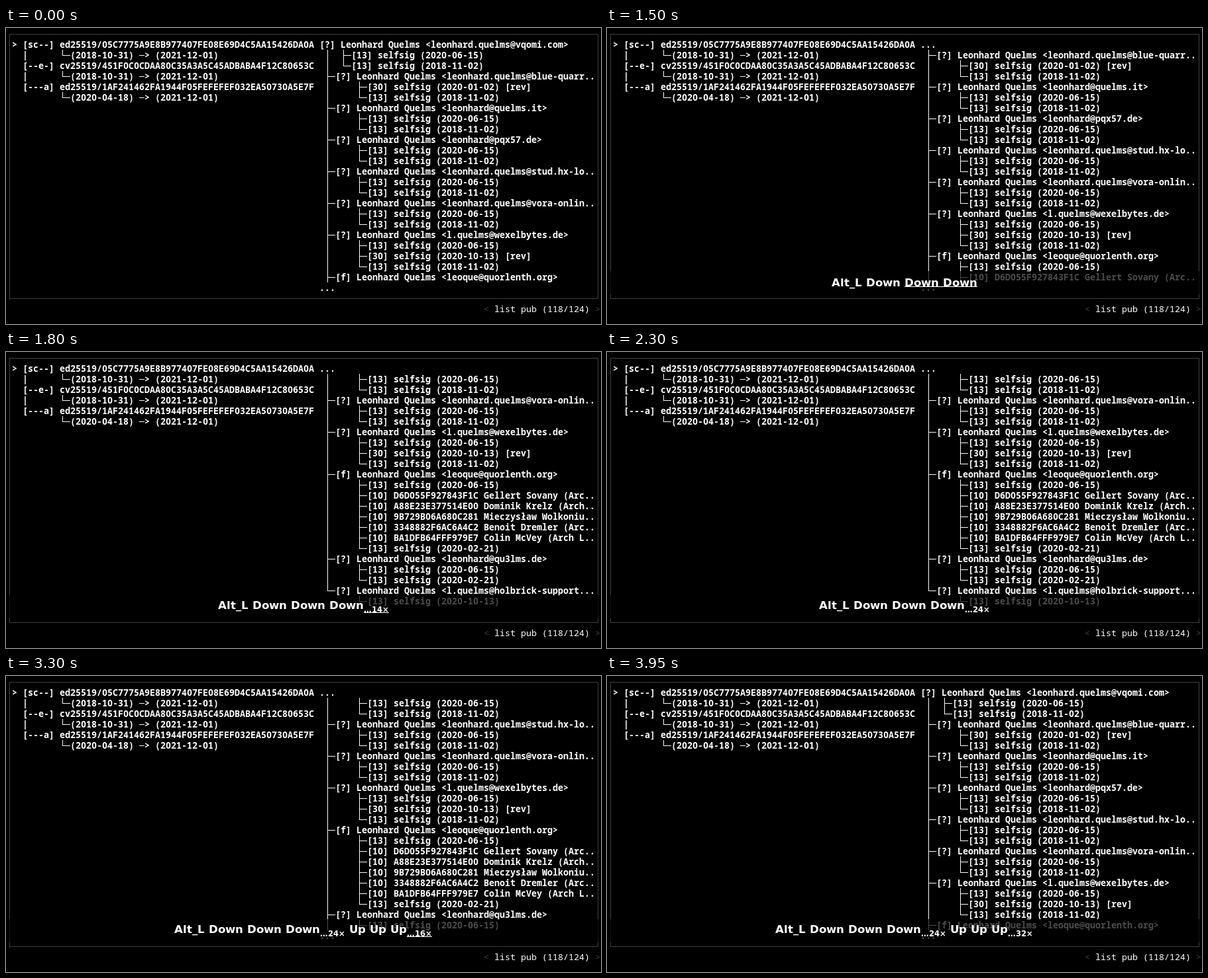
Recreate the animation shown at these times as an HTML page with a canvas. Size 898 by 448 pixels, loop 5150 ms.

```html
<!DOCTYPE html>
<html lang="en">
<head>
<meta charset="utf-8">
<title>Key list</title>
<style>
html, body { margin: 0; width: 100%; height: 100%; overflow: hidden; background: #000; }
canvas { display: block; }
</style>
</head>
<body>
<canvas width="898" height="448"></canvas>
<script>
const ctx = document.querySelector("canvas").getContext("2d");
const LOOP = 5150, CELL = 8, ROW = 16, LEFT = 9, TOP = 17;
const LIST_COL = 58, LAST_ROW = 23, MAX_SCROLL = 12;
const MONO = '13.333px "Noto Sans Mono", "DejaVu Sans Mono", monospace';
const ZERO = '13.333px "Noto Sans", "Open Sans", sans-serif'; // zero without a slash
const KEY_FONT = size => `bold ${size}px "DejaVu Sans", sans-serif`;

const keys = [
  "> [sc--] ed25519/05C7775A9E8B977407FE08E69D4C5AA15426DA0A",
  "  |      └─(2018-10-31) ─> (2021-12-01)",
  "  [--e-] cv25519/451F0C0CDAA80C35A3A5C45ADBABA4F12C80653C",
  "  |      └─(2018-10-31) ─> (2021-12-01)",
  "  [---a] ed25519/1AF241462FA1944F05FEFEFEF032EA50730A5E7F",
  "         └─(2020-04-18) ─> (2021-12-01)",
];

const self = (date, rev) => rev ? `[30] selfsig (${date}) [rev]` : `[13] selfsig (${date})`;
const usual = [self("2020-06-15"), self("2018-11-02")];
const users = [
  ["leonhard.quelms@vqomi.com>", usual],
  ["leonhard.quelms@blue-quarr..", [self("2020-01-02", true), self("2018-11-02")]],
  ["leonhard@quelms.it>", usual],
  ["leonhard@pqx57.de>", usual],
  ["leonhard.quelms@stud.hx-lo..", usual],
  ["leonhard.quelms@vora-onlin..", usual],
  ["l.quelms@wexelbytes.de>", [usual[0], self("2020-10-13", true), usual[1]]],
  ["leoque@quorlenth.org>", [
    usual[0],
    "[10] D6D055F927843F1C Gellert Sovany (Arc..",
    "[10] A88E23E377514E00 Dominik Krelz (Arch..",
    "[10] 9B729B06A680C281 Mieczysław Wolkoniu..",
    "[10] 3348882F6AC6A4C2 Benoit Dremler (Arc..",
    "[10] BA1DFB64FFF979E7 Colin McVey (Arch L..",
    self("2020-02-21"),
  ], "f"],
  ["leonhard@qu3lms.de>", [usual[0], self("2020-02-21")]],
  ["l.quelms@holbrick-support...", [self("2020-10-13")]],
];

const lines = users.flatMap(([mail, sigs, trust = "?"], i) => {
  const last = i === users.length - 1;
  const stem = i ? (last ? " └─" : " ├─") : "";
  const indent = (last ? "  " : " │") + " ".repeat(i ? 5 : 2);
  return [
    `${stem}[${trust}] Leonhard Quelms <${mail}`,
    ...sigs.map((sig, j) => indent + (j < sigs.length - 1 ? "├─" : "└─") + sig),
  ];
});

// Box characters become crisp lines; everything else is centred in its cell.
function drawText(text, col, row, weight = 600, color = "#fff") {
  ctx.fillStyle = color;
  ctx.textAlign = "center";
  const y = TOP + row * ROW;
  [...text].forEach((ch, i) => {
    const x = LEFT + (col + i) * CELL;
    if (!"│├└─".includes(ch)) {
      ctx.font = `${weight} ${ch === "0" ? ZERO : MONO}`;
      ctx.fillText(ch, x + CELL / 2, y + 13);
      return;
    }
    if (ch !== "─") ctx.fillRect(x + 4, y, 1, ch === "└" ? 9 : ROW);
    if (ch === "─") ctx.fillRect(x, y + 8, CELL, 1);
    else if (ch !== "│") ctx.fillRect(x + 4, y + 8, 4, 1);
  });
}

// Number of presses of a held key: one press, a second, then fast repeats.
function presses(t, first, repeat, max) {
  if (t < first) return 0;
  if (t < repeat) return 1;
  const step = Math.floor((t - repeat) / 50) * 50;
  return step ? Math.min(max, Math.floor(3.75 + (step - 50) / 27.5)) : 2;
}

function scrollAt(downs, ups) {
  let pos = downs;
  if (ups) pos = 24 - ups + (ups < 32);
  else if (downs > 1 && downs < 24) pos--;
  return Math.max(0, Math.min(MAX_SCROLL, pos));
}

function drawList(scroll) {
  for (let row = 0; row < LAST_ROW; row++) {
    drawText(row || !scroll ? lines[row + scroll] : "...", LIST_COL, row);
  }
  if (scroll < MAX_SCROLL) drawText("...", LIST_COL, LAST_ROW);
}

const isRecent = t =>
  t < 1300 || (t >= 1450 && t < 2300) || (t >= 2500 && t < 2700) || (t >= 2900 && t < 3950);

function keyParts(name, n, recent) {
  const part = (text, line, small) => ({ text, line, small });
  const words = count => Array(count).fill(name).join(" ");
  if (!n) return [];
  if (n > 3) return [part(" " + words(3)), part(`…${n}×`, recent, true)];
  if (!recent) return [part(" " + words(n))];
  const fresh = Math.max(1, n - 1);
  const old = n > fresh ? ` ${words(n - fresh)} ` : " ";
  return [part(old), part(words(fresh), true)];
}

function drawKeys(t, downs, ups) {
  ctx.fillStyle = "rgba(0,0,0,.7)";
  ctx.fillRect(0, 368, 898, 35);
  const recent = isRecent(t);
  const parts = [
    { text: "Alt_L", line: recent && !downs },
    ...keyParts("Down", downs, recent && !ups),
    ...keyParts("Up", ups, recent),
  ];
  // Glyphs advance by whole pixels.
  const advance = ch => Math.round(ctx.measureText(ch).width);
  const setFont = p => { ctx.font = KEY_FONT(p.small ? 11.6 : 16.6); };
  for (const p of parts) {
    setFont(p);
    p.width = [...p.text].reduce((sum, ch) => sum + advance(ch), 0);
  }
  const base = parts.some(p => p.small) ? 389 : 391;
  let x = Math.floor(449 - parts.reduce((sum, p) => sum + p.width, 0) / 2);
  ctx.fillStyle = "#fff";
  ctx.textAlign = "left";
  for (const p of parts) {
    const y = p.small ? 394 : base;
    setFont(p);
    if (p.line) ctx.fillRect(x, y, p.width, 1);
    for (const ch of p.text) {
      ctx.fillText(ch, x, y);
      x += advance(ch);
    }
  }
}

function draw(now) {
  const t = now % LOOP;
  const downs = presses(t, 1100, 1450, 24);
  const ups = presses(t, 2500, 2900, 32);
  ctx.fillStyle = "#000";
  ctx.fillRect(0, 0, 898, 448);
  ctx.strokeStyle = "#404040";
  ctx.strokeRect(5.5, 9.5, 888, 400);
  keys.forEach((text, row) => drawText(text, 0, row));
  drawList(scrollAt(downs, ups));
  drawText("<", 89, 25, 500, "#404040");
  drawText("list pub (118/124)", 91, 25, 500);
  drawText(">", 110, 25, 500, "#404040");
  if (t >= 900) drawKeys(t, downs, ups);
  requestAnimationFrame(draw);
}
requestAnimationFrame(draw);
</script>
</body>
</html>
```
